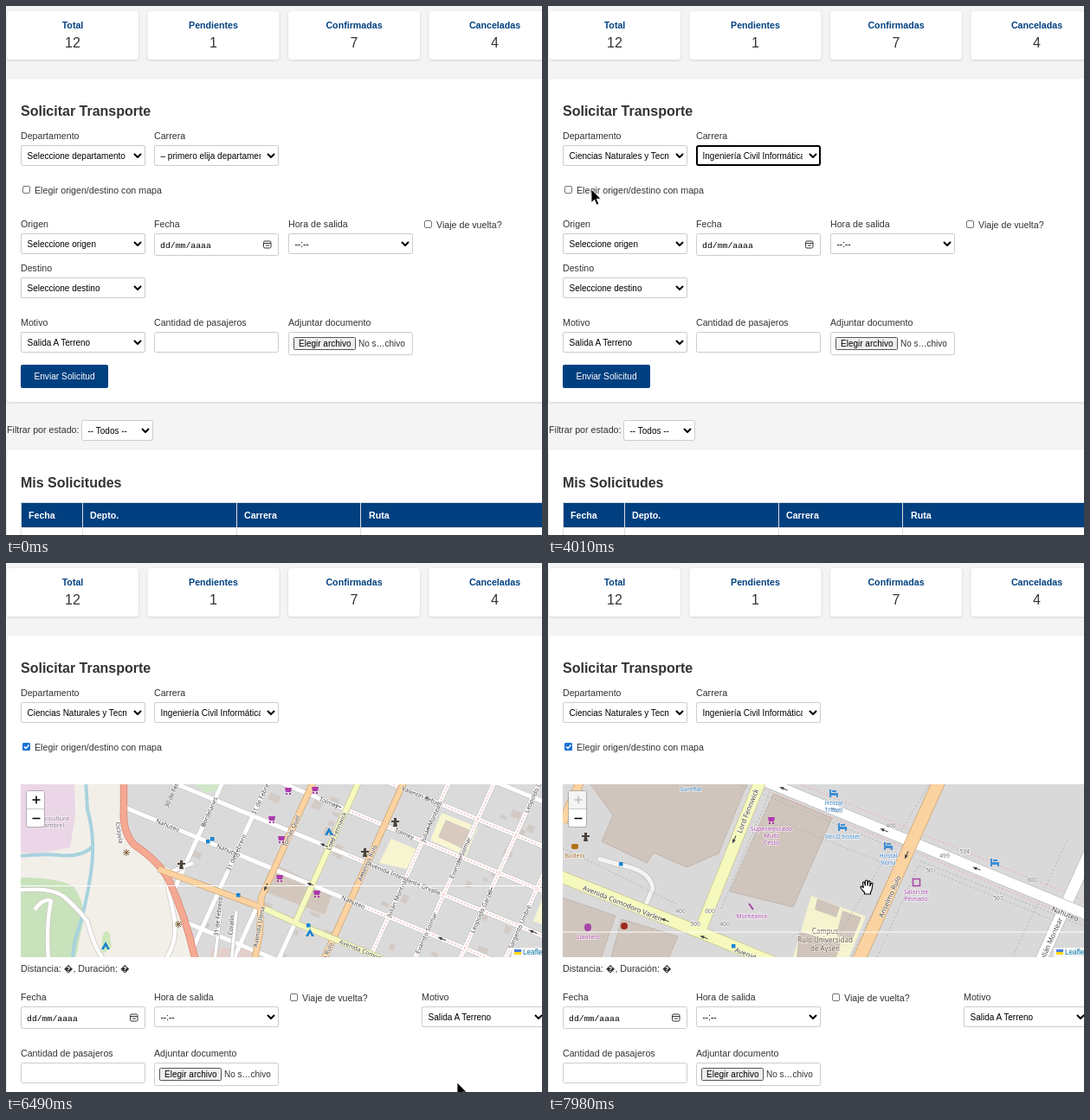
An HTML page for the animation above (8 s loop, 619 px wide and 612 px high).

```html
<!DOCTYPE html>
<html lang="es">
<head>
<meta charset="utf-8">
<title>Solicitar Transporte</title>
<style>
html, body { margin: 0; width: 100%; height: 100%; overflow: hidden; background: #f4f4f4; }
#stage { display: block; width: 619px; height: 612px; font-family: "Liberation Sans", Arial, sans-serif; }
text { white-space: pre; }
.map text { font-family: "Noto Sans", "Open Sans", sans-serif; paint-order: stroke; stroke: #fffb; stroke-width: 1.4px; text-anchor: middle; }
.card { fill: #fff; filter: drop-shadow(0 1px 1.5px #0002); }
.box { fill: #fff; stroke: #ccc; }
</style>
</head>
<body>
<svg id="stage" viewBox="0 0 619 612"></svg>
<script>
const LOOP = 8000, NAVY = '#004080', INK = '#333';
const stage = document.getElementById('stage');
const $ = id => document.getElementById(id);
const clamp = (v, a = 0, b = 1) => Math.min(b, Math.max(a, v));
const smooth = v => v * v * (3 - 2 * v);
const lerp = (a, b, k) => a + (b - a) * k;
const repeat = (n, fn) => Array.from({ length: n }, (_, i) => fn(i)).join('');

/* ---- drawing helpers ---- */
const label = (x, y, s, size = 10.67, fill = INK, more = '') =>
  `<text x="${x}" y="${y}" font-size="${size}" fill="${fill}" ${more}>${s}</text>`;
const rect = (x, y, w, h, more = '') => `<rect x="${x}" y="${y}" width="${w}" height="${h}" ${more}/>`;
const shape = (d, fill, more = '') => `<path d="${d}" fill="${fill}" ${more}/>`;
const line = (d, color, w, more = '') => shape(d, 'none', `stroke="${color}" stroke-width="${w}" stroke-linejoin="round" ${more}`);
const group = (id, body) => `<g id="${id}">${body}</g>`;
const BOLD = 'font-weight="bold"', CENTER = 'text-anchor="middle"';

/* ---- form parts ---- */
const frame = (x, y, w, h) => rect(x + .5, y + .5, w - 1, h - 1, 'rx="2" class="box"');
const field = (x, y, s, h = 24) => label(x, y - 7, s) + frame(x, y, 144, h);
const select = (x, y, s, id = '', w = 144) => frame(x, y, w, 24) +
  `<svg x="${x + 7}" y="${y}" width="${w - 28}" height="24">${label(.5, 16, s, 10, '#000', id && `id="${id}"`)}</svg>` +
  line(`M${x + w - 13} ${y + 10}l4 4 4-4`, '#000', 2);
const choice = (x, y, title, s, id) => field(x, y, title) + select(x, y, s, id);
const dateField = (x, y) => field(x, y, 'Fecha', 26) +
  label(x + 7, y + 16.5, 'dd/mm/aaaa', 9.8, '#000', 'font-family="Liberation Mono, monospace"') +
  rect(x + 126.5, y + 9, 8.5, 8, 'rx="1.5" fill="#fff" stroke="#333"') + line(`M${x + 127} ${y + 11.5}h8m-6 2.5h4`, INK, 1);
const fileField = (x, y) => field(x, y, 'Adjuntar documento', 27) +
  rect(x + 6.5, y + 6.5, 71, 14, 'rx="1" fill="#efefef" stroke="#555"') +
  label(x + 12, y + 17, 'Elegir archivo', 10, '#000') + label(x + 81, y + 17, 'No s…chivo', 10);
const check = (x, y, s) => rect(x + .5, y + .5, 8, 8, 'rx="1.5" fill="#fff" stroke="#767676"') + label(x + 14, y + 9, s);
const heading = (y, s) => label(17, y, s, 16, INK, BOLD);
const popup = (id, x, w, items) => group(id,
  rect(x + .5, 189.5, w, items.length * 24 + 1, 'fill="#fff" stroke="#444"') +
  rect(x + 1, 190, w - 1, 24, 'fill="#767676"') +
  items.map((s, i) => label(x + 8.5, 206 + 24 * i, s, 10, '#000')).join(''));

/* ---- map parts ---- */
const tag = (x, y, s, a = 0, size = 7, fill = '#444') =>
  label(0, 2.5, s, size, fill, `transform="translate(${x} ${y}) rotate(${a})"`);
const tags = (x, y, s, size, fill, gap = 8) => s.split('|').map((w, i) => tag(x, y + gap * i, w, 0, size, fill)).join('');
const road = (d, w, fill, edge = '#bbb') => line(d, edge, w + 1.4) + line(d, fill, w);
const tent = (x, y) => shape(`M${x} ${y - 5}l5 9h-3l-2-4-2 4h-3z`, '#1583cf');
const shop = (x, y) => shape(`M${x - 4} ${y - 3}h8l-1 5h-6zm1 6h2v2h-2zm4 0h2v2h-2z`, '#ac39ac');
const busStop = (x, y) => rect(x - 2, y - 2, 4.5, 4.5, 'fill="#1a86d0"');
const bed = (x, y) => shape(`M${x - 5} ${y - 5}h2v4h8v5h-2v-2h-6v2h-2zm3 1h5v2h-5z`, '#3b8fd6');
const star = (x, y) => line(`M${x - 4} ${y}h8m-4-4v8m-3-7l6 6m0-6l-6 6`, '#7a5a34', 1);
const statue = (x, y) => shape(`M${x - 1} ${y - 5}h3v3h3v2h-3l1 5h-5l1-5h-3v-2h3z`, '#4b4238');
const arrow = (x, y, a) => shape('M-5 0l5-2v1.5h5v1h-5v1.5z', '#444', `transform="translate(${x} ${y}) rotate(${a})"`);

let seed = 7;
const rnd = (a = 0, b = 1) => lerp(a, b, (seed = seed * 16807 % 2147483647) / 2147483647);
function blob(cx, cy, rx, ry, fill) {
  const d = repeat(18, i => {
    const a = i / 9 * Math.PI, r = rnd(.65, 1.15);
    return `${i ? 'L' : 'M'}${(cx + rx * r * Math.cos(a)).toFixed(1)} ${(cy + ry * r * Math.sin(a)).toFixed(1)}`;
  });
  return shape(d + 'z', fill);
}

function region() {
  const wood = '#bfdcae', lake = '#a9d2de';
  const border = 'M565 256L570 268 590 286 588 301 575 313 511 316 450 343 464 352 446 364 451 389 433 410 441 430 432 456';
  return rect(-600, -200, 1900, 1100, 'fill="#f1eee8"') +
    blob(390, 279, 50, 17, wood) + blob(355, 387, 62, 26, wood) + blob(240, 346, 18, 15, wood) + blob(520, 428, 92, 32, wood) +
    blob(500, 345, 50, 14, wood) + blob(602, 290, 22, 26, wood) +
    repeat(40, () => blob(rnd(310, 610), rnd(270, 455), rnd(4, 14), rnd(2, 8), '#c6dfb7')) +
    blob(190, 438, 16, 7, lake) + blob(403, 411, 9, 17, lake) +
    repeat(7, i => blob(42 + 9 * i, 320 + 13 * i, rnd(3, 8), rnd(5, 14), lake)) +
    line('M17 285Q40 310 44 335T75 375 92 456M110 256Q125 300 175 340T300 350Q360 325 400 300T590 290M400 411Q425 370 460 360T619 345', '#aad3df', 1.3) +
    repeat(16, i => line(`M${538 + i % 4 * 14} ${345 + (i >> 2) * 4}h${4 + i % 3 * 3}`, '#9fcbe0', 1)) +
    repeat(13, () => line(`M${rnd(0, 560)} ${rnd(260, 450)}q${rnd(0, 50)} ${rnd(-20, 20)} ${rnd(50, 100)} ${rnd(-15, 15)}t60 ${rnd(-20, 20)}`, '#d3cdcc', 1)) +
    line('M135 256L160 292 100 303 106 330 130 345 132 382 160 377 205 390 236 361 217 346 229 325 197 287 182 270 205 262 252 286 280 256', '#acd0a4', 2.6) +
    shape('M305 307L345 303 352 325 308 334z', '#add19e', 'stroke="#8fbc8c" stroke-width="2"') +
    line('M352 256L333 284 306 299 300 315', '#f5c98f', 1.8) +
    line('M122 256Q145 268 180 270T240 292L298 304 301 347 284 372 298 394 306 456', '#f3aa94', 2.2) +
    line(border, '#b7a2b9', 3.4) + line(border, '#8e7191', .7) +
    line('M17 357.5H619', '#fff', 1.2) + line('M299.5 256V456', '#fff9', 1) +
    `<g font-style="italic" font-weight="600">${tags(163, 268, 'Reserva|Nacional|Río Tambrel', 7.5, '#3f9344', 9.5)}</g>` +
    tag(300, 350, 'Coyhaique', 0, 8.5, '#555') + shape('M282 359l1 4 4 2h-4l-1 5-1-5h-4l4-2z', '#8461c4', 'stroke="#8461c4"');
}

/* The street grid: "down" streets cross the "side" streets at fixed slopes. */
const downX = (i, y) => 220 + 52.3 * i - (y - 256) * .45;
const sideY = (i, x) => 189.6 + 51.8 * i + (x - 341) * .415;
const down = (i, a = -300, b = 900) => `M${downX(i, a)} ${a}L${downX(i, b)} ${b}`;
const side = (i, a = -500, b = 1300) => `M${a} ${sideY(i, a)}L${b} ${sideY(i, b)}`;
const downTag = (i, y, s) => tag(downX(i, y), y, s, -66);
const sideTag = (i, x, s) => tag(x, sideY(i, x), s, 22.5);

function city() {
  const streets = repeat(12, i => down(i)) + repeat(9, i => side(i - 3));
  const dots = 'stroke-dasharray="2 2"', amber = '#fbd2a0', lemon = '#f6f9bd';
  const bend = 'V256Q118 282 132 297Q163 318 173 340Q196 390 208 456L250 900';
  return rect(-1200, -700, 3000, 2200, 'fill="#dbdadb"') +
    shape('M285 352L300 322 362 352 352 378z', '#d3c7bd') + shape('M222 416h48l-6 40h-50z', '#e3d0cb') +
    shape('M415 318L429 290 459 303 447 325zM474 292L487 260 529 277 515 310zM593 385L604 358 640 370 630 400z', '#f7f6d0') +
    shape('M483 288L492 268 522 281 512 302z', '#d8cabf') + shape('M196 220l24-2 12 14-18 6z', '#cfe8c8') +
    repeat(34, () => {
      const x = rnd(200, 590), y = rnd(235, 435);
      return rect(x, y, rnd(5, 13), rnd(4, 10), `fill="#d2cac4" transform="rotate(23 ${x} ${y})"`);
    }) +
    line(streets, '#c4c2c2', 6.2) + line(streets, '#fff', 5) +
    line(repeat(4, i => down(i + 5) + side(i, 380)), '#f2a8a4', 1, dots) +
    road('M232 372L222 456M250 374L242 456', 3.5, '#fff') +
    shape(`M-900 -700H120${bend}V1400H-900z`, '#f2efe9') +
    shape('M-30 190H62L64 262 58 300 17 308-30 300z', '#ead6e6') +
    shape('M-60 345Q20 325 62 345Q80 370 70 400L62 440Q60 480 20 520H-60z', '#c8e2bc') + shape('M95 405q4-14 9-4l2 15-12 8z', '#cde7ba') +
    line('M72 150L78 256Q88 290 82 330T66 400 62 500M-40 315Q20 306 45 309T83 300', '#a8d2de', 4) +
    road('M-20 352Q35 343 52 358T78 386Q90 432 110 441T164 436Q184 410 178 380L168 331 200 318M17 372Q28 358 36 362Q28 400 36 456', 4.5, '#fff', '#c9c4bd') +
    road('M120 -300' + bend, 7, '#f5a892', '#d58373') +
    road('M160 325L283 371' + down(2, -300, 358) + 'L277 400 266 456 230 800' + down(4) + 'M272 441L345 458', 6.3, amber, '#c9a16c') +
    road('M283 371' + side(4, 322).replace('M', 'L') + down(3, -300, 389), 6, lemon, '#c3c58d') +
    repeat(9, i => {
      const y = 272 + i * 37 % 90, x = 352 + 52.3 * i - (y - 256);
      return arrow(downX(i, y), y, -66) + arrow(x, sideY(3 - i % 4, x), 22);
    }) +
    [171, 241, 385].map(x => sideTag(3, x, 'Nahuteo')).join('') +
    downTag(0, 259, 'Bordelanes') + downTag(-1, 239, '30 de Feb') + downTag(1, 306, '31 de Febrero') + downTag(1, 241, '31 de Febrero') +
    tag(229, 380, '31 de Febrero', -84) + tag(244, 390, 'Coralín', -84) + tag(276, 392, 'Avenida Ulena', -80) +
    downTag(2, 281, 'Tomás Quel') + downTag(3, 281, 'Lord Fennwick') + downTag(4, 318, 'Anselmo Rulo') + downTag(4, 431, 'Anselmo Rulo') +
    [0, 87].map(dy => downTag(5, 271 + dy, 'Julián Montear') + downTag(6, 312 + dy, 'Evaristo Solmar')).join('') +
    downTag(7, 374, 'Leopoldo Garzel') + downTag(7, 235, 'Leopoldo Garzel') + downTag(8, 392, 'Sargento Umbré') +
    sideTag(0, 464, 'Valentín Ortuel') + sideTag(1, 444, 'Tolmey') + sideTag(1, 357, 'Tolmey') +
    sideTag(2, 444, 'Avenida Intendente Orvalle') + sideTag(4, 409, 'Avenida Comodoro Varlen') +
    tag(300, 448, 'Los Maitrones', 8) + tag(115, 283, 'Ciclovía', 80) +
    tags(38, 266, 'Piscicultura|Tambrel', 7, '#8b7a92') + tags(61, 445, 'Vista a|Loma', 7, '#777') +
    tent(357, 282) + tent(335, 399) + tent(99, 414) + busStop(217, 293) + busStop(222, 290) + busStop(252, 355) + busStop(333, 390) +
    shop(291, 267) + shop(302, 290) + shop(300, 335) + shop(343, 353) + shop(341, 233) + shop(310, 234) +
    star(123, 306) + star(183, 389) + star(60, 435) + statue(186, 320) + statue(398, 306) + statue(433, 271) +
    line('M-200 344.5H900', '#fff', 1);
}

function block() {
  const dots = 'stroke-dasharray="2 2.5"', blue = '#3586cf', plum = '#a646a8', amber = '#fbd3a1', lemon = '#f6f9bd';
  const along = x => 256 + (x - 260) * .415;
  return rect(-300, 0, 1300, 800, 'fill="#dad9da"') +
    shape('M45 250H232L197 336 160 352 122 335 114 347 62 322 75 292zM210 380L260 267 328 295 283 398zM10 385L78 408 60 460H10zM85 412L150 432 138 460H72z', '#d0c5bd', 'stroke="#c2b4aa"') +
    shape('M282 460L304 385 367 409 346 460z', '#f5f4cf') +
    shape('M311 388l26 10-4 12-25-9zM340 402l22 8-11 27-18-7zM290 426l48 14-5 16h-46z', '#d0c4bb') +
    road('M58 342L82 349Q118 355 121 376L113 395', 5, '#f4f4f4') +
    line('M270 300L400 352 350 456M220 256L400 330M17 330L150 395M200 400L260 256M330 440L440 256M430 345L619 420M380 456L428 350 580 412M530 470L600 320', '#aaa', .8, dots) +
    line('M272 248L619 390M250 262L619 416', '#f0a5a5', .9, dots) +
    road('M560 480L625 336', 13, '#fff') + road('M235 246L680 430.5', 12, '#fff') +
    road('M350 479L455 245', 14, amber, '#c9a16c') + road('M17 300L40 246', 9, amber, '#c9a16c') +
    road('M0 357L175 427 280 470M175 427L248 245', 13, lemon, '#c3c58d') +
    tag(231, 287, 'Lord Fennwick', -68, 8) + tag(86, 394, 'Avenida Comodoro Varlen', 22, 8) + tag(230, 453, 'Avenida', 22, 8) +
    tag(395, 386, 'Anselmo Rulo', -66, 8) + tag(597, 406, 'Nahuteo', 22, 8) + tag(581, 436, 'Julián Montear', -66, 8) +
    repeat(4, i => tag(272 + 62 * i, along(272 + 62 * i) - 9 + 9 * (i & 1), 400 + 33 * i, 0, 6.8, '#777')) +
    repeat(4, i => tag(442 + 39 * i, along(442 + 39 * i) + (i & 1 ? -14 : 24), 501 + 33 * i, 0, 6.8, '#777')) +
    repeat(4, i => tag(153 + 17 * i, 402 + i % 2 * 15, 400 + 100 * (i % 3), 0, 6.8, '#777')) +
    [272, 330, 388, 495].map(x => arrow(x, along(x), 22)).join('') + arrow(215, 320, -66) + arrow(414, 338, -66) + arrow(180, 433, 22) + arrow(135, 413, 22) +
    bed(330, 267) + tags(330, 277, 'Hostal|Trebel', 7, blue) + bed(340, 306) + tag(340, 316, 'Vel-O hostel', 0, 7, blue) +
    bed(393, 328) + tags(393, 338, 'Hostal|Vonu', 7, blue) + bed(516, 347) + tag(165, 261, 'Sureñal', 0, 7, blue) +
    shop(258, 297) + tags(258, 307, 'Supermercado|Multi|Cesto', 7, plum) + line('M232 394l5 7', plum, 2) + tag(235, 408, 'Montealira', 0, 7, plum) +
    rect(421.5, 365.5, 8, 8, `fill="none" stroke="${plum}" stroke-width="1.5"`) + tags(425, 380, 'Salón de|Peinado', 7, plum) +
    tags(320, 426, 'Campus|Rulo Universidad|de Aysén', 8, '#6b5a45', 10) +
    rect(27, 325, 8, 6, 'rx="2" fill="#b46f16"') + tag(31, 338, 'Bodeni', 0, 7, '#a66a20') + statue(43, 317) +
    rect(42, 417, 8, 9, `rx="4" fill="${plum}"`) + tag(46, 432, 'Llantelo', 0, 7, plum) +
    rect(84, 416, 8, 8, 'rx="4" fill="#9c2b20"') + busStop(214, 443) + busStop(84, 348) + line('M-200 427H900', '#fff', 1.2);
}

/* ---- scene ---- */
const stat = ([s, n], i) => {
  const x = 1 + 162.5 * i;
  return rect(x, 6, 152, 56, 'rx="4" class="card"') +
    label(x + 76, 26, s, 10.67, NAVY, BOLD + CENTER.padStart(CENTER.length + 1)) + label(x + 76, 48, n, 16, INK, CENTER);
};

const plainForm = () => rect(1, 84, 640, 374, 'rx="4" class="card"') +
  choice(17, 263, 'Origen', 'Seleccione origen') + dateField(171, 263) + choice(326, 263, 'Hora de salida', '--:--') +
  check(483, 248, 'Viaje de vuelta?') + choice(17, 314, 'Destino', 'Seleccione destino') +
  choice(17, 377, 'Motivo', 'Salida A Terreno') + field(171, 377, 'Cantidad de pasajeros') + fileField(326, 377) +
  rect(17, 415, 101, 27, `rx="2" fill="${NAVY}"`) + label(67.5, 432, 'Enviar Solicitud', 10.2, '#fff', CENTER) +
  label(1, 494, 'Filtrar por estado:') + select(87, 479, '-- Todos --', '', 83) +
  rect(1, 513, 640, 140, 'rx="4" class="card"') + heading(557, 'Mis Solicitudes') + rect(17, 574, 620, 29, `fill="${NAVY}"`) +
  line('M17.5 574V612M88.5 574V612M266.5 574V612M409.5 574V612M17 574.5H619M17 603.5H619', '#ddd', 1) +
  Object.entries({ Fecha: 26, 'Depto.': 97, Carrera: 275, Ruta: 419 }).map(([s, x]) => label(x, 593, s, 10.67, '#fff', BOLD)).join('');

const mapForm = () => rect(1, 84, 640, 560, 'rx="4" class="card"') +
  `<svg class="map" x="17" y="256" width="602" height="200" viewBox="17 256 602 200">${rect(17, 256, 602, 200, 'fill="#ddd"')}` +
  group('region', region()) + group('city', city()) + group('block', block()) + '</svg>' +
  rect(23.5, 263.5, 21, 42, 'rx="2" fill="#fff" stroke="#0004"') + rect(24, 264, 20, 20, 'id="plusBack"') +
  line('M24 284.5H44', '#ccc', 1) + line('M30.5 274h9m-4.5-4.5v9', '#000', 1.5, 'id="plus"') + line('M30.5 295.5h9', '#000', 1.5) +
  rect(584, 445, 35, 11, 'fill="#fffc"') + rect(587, 447, 8, 3, 'fill="#4c7be1"') + rect(587, 450, 8, 3, 'fill="#ffd500"') +
  label(597, 453, 'Leaflet', 8.2, '#0078a8') + label(17, 473, 'Distancia: \uFFFD, Duración: \uFFFD') +
  dateField(17, 513) + choice(171, 513, 'Hora de salida', '--:--') + check(328, 498, 'Viaje de vuelta?') +
  choice(480, 513, 'Motivo', 'Salida A Terreno') + field(17, 578, 'Cantidad de pasajeros') + fileField(171, 578);

stage.innerHTML = rect(0, 0, 619, 612, 'fill="#f4f4f4"') +
  [['Total', 12], ['Pendientes', 1], ['Confirmadas', 7], ['Canceladas', 4]].map(stat).join('') +
  group('plainForm', plainForm()) + group('mapForm', mapForm()) + heading(127, 'Solicitar Transporte') +
  choice(17, 161, 'Departamento', '', 'dept') + choice(171, 161, 'Carrera', '', 'career') +
  rect(0, 162, 142, 22, 'id="ring" rx="2" fill="none" stroke="#000" stroke-width="2"') + check(19, 208, 'Elegir origen/destino con mapa') +
  group('checked', rect(19, 208, 9, 9, 'rx="1.5" fill="#1a73d8"') + line('M21 212.5l2 2 3.5-4', '#fff', 1.4)) +
  popup('deptList', 17, 162, ['Seleccione departamento', 'Ciencias de la Salud', 'Ciencias Naturales y Tecnología', 'Ciencias Sociales y Humanidades', 'Otro']) +
  popup('careerList', 171, 143, ['Seleccione carrera', 'Agronomía', 'Geología', 'Ingeniería Civil Industrial', 'Ingeniería Civil Informática', 'Ingeniería Forestal']) +
  group('pointer',
    shape('M0 0V15.5L3.6 12.2 6.2 18.2 8.8 17 6.2 11.2H11z', '#000', 'id="arrow" stroke="#fff" stroke-width=".8"') +
    shape('M-3.5 8V6Q-8 2-8-.5Q-6.5-2-4.7 1L-5.5-5Q-4.5-7-3.3-5L-2.6-1.5V-7Q-1.3-9 0-7V-1.5L.8-6.5Q2.3-8 3-6L2.7-1 4.3-4.5Q6-5.5 6-3.5L4.8 3.5 3.5 6V8z', '#fff', 'id="hand" stroke="#000" stroke-width="1.1"') +
    '<circle id="press" cx="1" r="12.5" fill="#f7ee55" style="mix-blend-mode:multiply"/>');

/* ---- motion: each glide is start, end, x, y; the pointer rests in between ---- */
const glides = [[0, 30, 549, 573], [30, 430, 20, 137], [430, 660, 95, 165], [930, 1690, 100, 260], [1940, 2640, 240, 179],
  [2840, 3330, 238, 300], [3520, 4010, 50, 212], [4130, 4280, 22, 211], [4360, 5120, 356, 347], [5360, 5930, 356, 440],
  [5960, 6230, 538, 594], [6430, 6490, 521, 601], [6510, 6670, 388, 402], [6870, 7020, 372, 373], [7510, 7970, 369, 375]];

function pointerAt(t) {
  let [, , x, y] = glides[0];
  for (const [a, b, toX, toY] of glides) {
    const k = smooth(clamp((t - a) / (b - a)));
    x = lerp(x, toX, k);
    y = lerp(y, toY, k);
  }
  return [x, y];
}
const within = (t, a, b) => t >= a && t < b;
const show = (id, on) => $(id).setAttribute('display', on ? 'inline' : 'none');
const place = (id, x, y, k, ax, ay) => $(id).setAttribute('transform', `translate(${x} ${y}) scale(${k}) translate(${-ax} ${-ay})`);
const fade = (id, v) => { $(id).setAttribute('opacity', v); show(id, v > 0); };

function drawMap(t) {
  const u = smooth(clamp((t - 5360) / 560));
  const v = 1 - (1 - clamp((t - 7510) / 420)) ** 3;
  const drag = smooth(clamp((t - 6870) / 150));
  const x = lerp(296, 319, u), y = lerp(352, 356, u);
  place('region', x, y, 16 ** u, 296, 352);
  fade('region', u < 1 ? clamp((t - 4360) / 300) : 0);
  if (v > 0) place('city', 368, 375, 4 ** v, 368, 375);
  else place('city', x - 16 * drag, y - 29 * drag, 16 ** (u - 1), 303, 327);
  fade('city', v < 1 ? clamp((u - .5) / .3) : 0);
  place('block', 368, 375, 4 ** (v - 1), 368, 375);
  fade('block', clamp((v - .6) / .35));
  $('plus').setAttribute('stroke', v > 0 ? '#bbb' : '#000');
  $('plusBack').setAttribute('fill', v > 0 ? '#f4f4f4' : '#fff');
}

function drawList(id, open, y) {
  show(id, open);
  const [back, mark] = $(id).querySelectorAll('rect'), options = $(id).querySelectorAll('text');
  const row = clamp(Math.floor((y - 190) / 24), 0, options.length - 1);
  mark.setAttribute('y', 190 + 24 * row);
  options.forEach((o, i) => o.setAttribute('fill', i === row ? '#fff' : '#000'));
}

function draw(t) {
  const [x, y] = pointerAt(t), mapped = t >= 4300;
  show('plainForm', !mapped);
  show('mapForm', mapped);
  show('checked', mapped);
  $('dept').textContent = t < 1930 ? 'Seleccione departamento' : 'Ciencias Naturales y Tecnología';
  $('career').textContent = t < 1930 ? '– primero elija departamento' : t < 3510 ? 'Seleccione carrera' : 'Ingeniería Civil Informática';
  show('ring', within(t, 1930, 2700) || within(t, 3510, 4300));
  $('ring').setAttribute('x', t < 3000 ? 18 : 172);
  drawList('deptList', within(t, 920, 1930), y);
  drawList('careerList', within(t, 2700, 3510), y);
  if (mapped) drawMap(t);

  const onMap = mapped && y > 256 && y < 456;
  show('pointer', t >= 30);
  $('pointer').setAttribute('transform', `translate(${x} ${y})`);
  show('arrow', !onMap);
  show('hand', onMap);
  show('press', within(t, 5150, 5350) || within(t, 6870, 7020) || within(t, 7250, 7350));
}

function loop() {
  draw(performance.now() % LOOP);
  requestAnimationFrame(loop);
}
loop();
</script>
</body>
</html>
```
